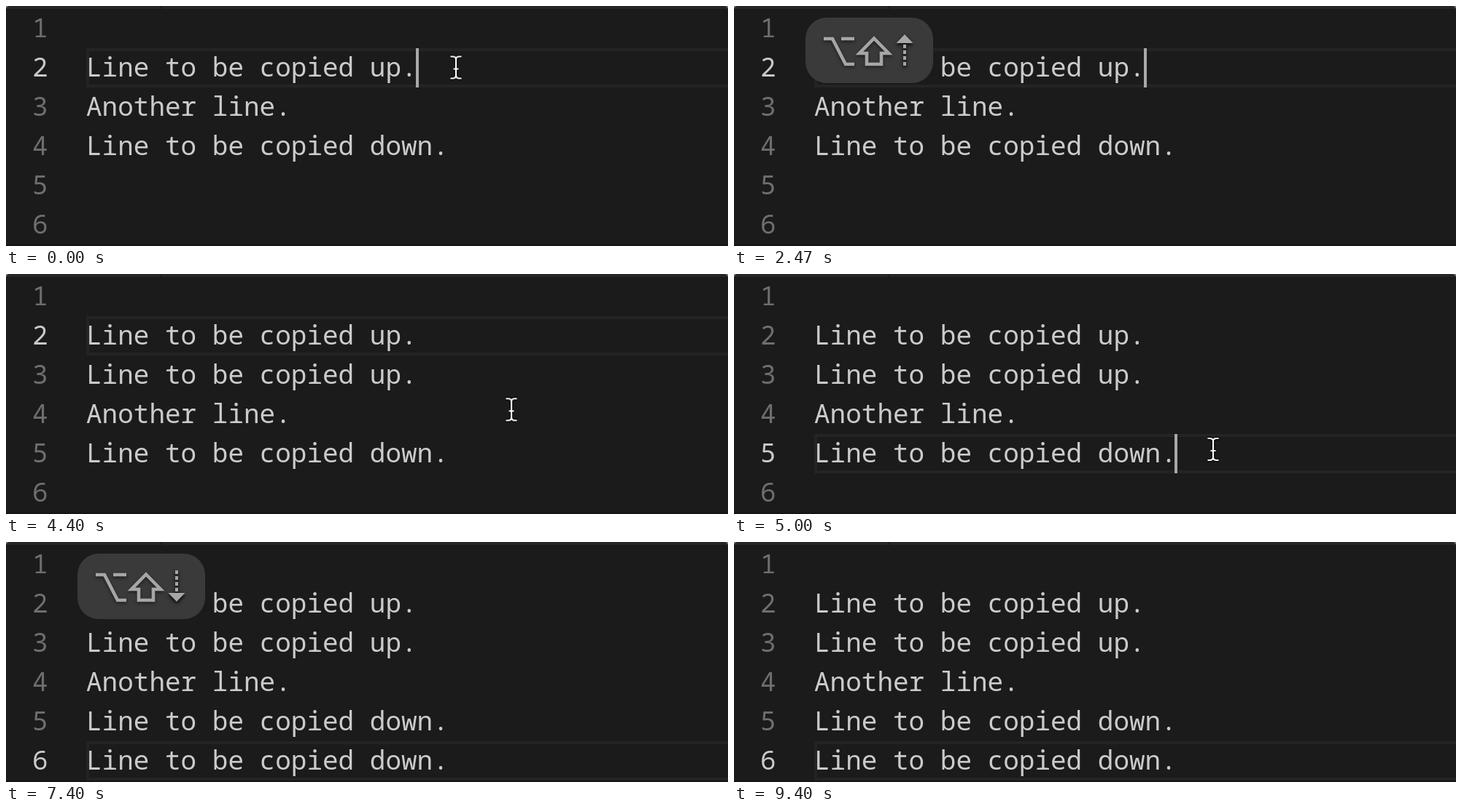
These frames come from a looping animation (990 px wide and 330 px high, 9740 ms). An HTML page:

```html
<!DOCTYPE html>
<html lang="en">
<head>
<meta charset="utf-8">
<title>Copy line up and down</title>
<style>
  html, body { margin: 0; width: 100%; height: 100%; overflow: hidden; background: #1b1b1b; }
  svg { display: block; width: 990px; height: 330px; }
  text { font: 36px "Noto Sans Mono", "DejaVu Sans Mono", monospace; fill: #cbcbcb; white-space: pre; }
  .nums text { fill: #6e6e6e; }
  #copyUp, #copyDown, #keys, #down { opacity: 0; }
  #keys path { fill: none; stroke: #a6a6a6; stroke-width: 4.6; }
  #keys .solid { fill: #a6a6a6; stroke: none; }
  #keys .dash { stroke-width: 4; stroke-dasharray: 5 3; }
  #keys g { filter: drop-shadow(0 2px 2px #0008); }
  #mouse use { fill: none; stroke: #fff; stroke-width: 2.2; }
  #mouse .edge { stroke: #000; stroke-width: 4.4; }
</style>
</head>
<body>
<svg viewBox="0 0 990 330">
  <defs>
    <path id="beam" d="M-7.5 -15H-5Q0 -15 0 -11V11Q0 15 -5 15H-7.5M7.5 -15H5Q0 -15 0 -11M0 11Q0 15 5 15H7.5M-3.500 2H3.500"/>
  </defs>
  <rect width="990" height="330" fill="#1b1b1b"/>
  <path d="M0 0H990V4H0Z" fill="#262626"/>
  <path d="M212 0h2v4h-2z" fill="#1b1b1b"/>
  <path d="M0 0H4Q1 1 0 4ZM990 0H986Q989 1 990 4Z" fill="#777"/>
  <path d="M0 328H990V330H0Z" fill="#171517"/>

  <rect id="current" x="112" y="60" width="890" height="50" fill="none" stroke="#242424" stroke-width="4"/>

  <g class="nums">
    <text x="36" y="43">1</text>
    <text x="36" y="97" id="n2">2</text>
    <text x="36" y="151">3</text>
    <text x="36" y="205">4</text>
    <text x="36" y="259" id="n5">5</text>
    <text x="36" y="313" id="n6">6</text>
  </g>

  <text x="110" y="97">Line to be copied up.</text>
  <text x="110" y="151" id="copyUp">Line to be copied up.</text>
  <g id="rest">
    <text x="110" y="151">Another line.</text>
    <text x="110" y="205">Line to be copied down.</text>
  </g>
  <text x="110" y="313" id="copyDown">Line to be copied down.</text>

  <g id="caretPos"><rect id="caret" x="562" y="58" width="4" height="54" fill="#a8a8a8"/></g>

  <g id="keys">
    <rect x="98" y="16" width="175" height="90" rx="29" fill="#3a3a3a"/>
    <g>
      <path d="M123 45H135L153 80H165M147 45H165"/>
      <path d="M192 44.5L212 65H202V80H182V65H172Z"/>
      <g id="up">
        <path class="solid" d="M234 39L245.500 51H222.500Z"/>
        <path class="dash" d="M234 53V82"/>
      </g>
      <g id="down">
        <path class="solid" d="M234 82L245.500 70H222.500Z"/>
        <path class="dash" d="M234 68V39"/>
      </g>
    </g>
  </g>

  <g id="mouse">
    <g id="pointer">
      <use href="#beam" class="edge"/>
      <use href="#beam"/>
    </g>
  </g>
</svg>
<script>
  const LOOP = 9740;
  const COPY_UP = 2530, CLICK = 4930, COPY_DOWN = 6930;

  // keys: [time in ms, value] pairs; each value holds until the next unless eased
  function play(id, prop, keys, easing = 'step-end') {
    const frames = keys.map(([t, v]) => ({ offset: t / LOOP, [prop]: v, easing }));
    frames.push({ offset: 1, [prop]: keys[keys.length - 1][1] });
    document.getElementById(id).animate(frames, { duration: LOOP, iterations: Infinity });
  }

  // Visible at first or not, then switched at each of the given times
  function toggle(id, on, times) {
    play(id, 'opacity', [0, ...times].map((t, i) => [t, (i % 2 === 0) === on ? 1 : 0]));
  }

  const at = (x, y) => `translate(${x}px, ${y}px)`;
  const dim = '#6e6e6e', lit = '#c9c9c9';

  toggle('copyUp', false, [COPY_UP]);
  toggle('copyDown', false, [COPY_DOWN]);
  play('rest', 'transform', [[0, at(0, 0)], [COPY_UP, at(0, 54)]]);

  play('current', 'transform', [[0, at(0, 0)], [CLICK, at(0, 162)], [COPY_DOWN, at(0, 216)]]);
  play('n2', 'fill', [[0, lit], [CLICK, dim]]);
  play('n5', 'fill', [[0, dim], [CLICK, lit], [COPY_DOWN, dim]]);
  play('n6', 'fill', [[0, dim], [COPY_DOWN, lit]]);

  play('caretPos', 'transform', [[0, at(0, 0)], [CLICK, at(42, 162)], [COPY_DOWN, at(42, 216)]]);
  toggle('caret', true, [470, 930, 1400, 1930, 3000, 3530, 4000, 4530, 5400, 5930, 6400,
    COPY_DOWN, 7400, 7930, 8400, 8930, 9400]);

  play('keys', 'opacity', [[0, 0], [2470, 1], [3400, .65], [3470, .3], [3530, 0],
    [6870, 1], [7800, .65], [7870, .3], [7930, 0]]);
  toggle('up', true, [5000]);
  toggle('down', false, [5000]);

  toggle('mouse', true, [2470, 4270, 6870, 8730, 8870]);
  play('pointer', 'transform', [[0, at(617, 84.5)], [4200, at(617, 84.5)], [4270, at(640, 112)],
    [4400, at(693, 186)], [4470, at(697, 210)], [4600, at(686, 234)], [4800, at(657, 241)],
    [8730, at(657, 241)], [8870, at(718, 300)]], 'linear');
</script>
</body>
</html>
```
